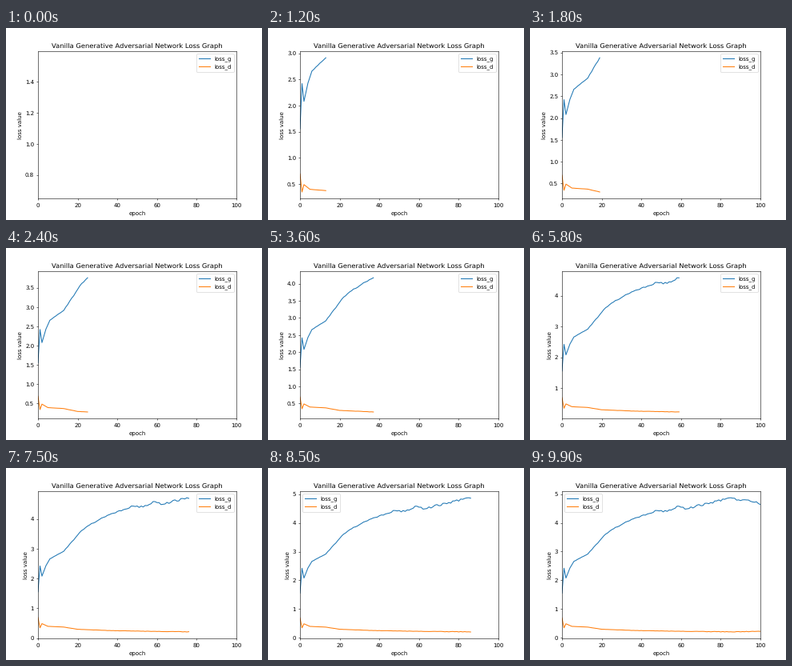
Write a matplotlib script that moves like this. It is 320 px wide and 240 px high and loops after 10000 ms.

```python
import numpy as np
import matplotlib.pyplot as plt
from matplotlib.animation import FuncAnimation

EPOCHS = 100
FRAMES = 100
INTERVAL = 100

plt.rcParams["text.hinting"] = "none"

rng = np.random.default_rng(4)
epochs = np.arange(EPOCHS + 1)


def loss_curve(points, wobble):
    """Join key points and add jitter that grows with the epoch."""
    keys, values = zip(*points)
    jitter = rng.uniform(-wobble, wobble, epochs.size) * epochs / EPOCHS
    jitter[list(keys)] = 0
    return np.interp(epochs, keys, values) + jitter


loss_g = loss_curve([(0, 1.554), (1, 2.42), (2, 2.08), (4, 2.43), (6, 2.66),
                     (13, 2.915), (22, 3.61), (25, 3.76), (35, 4.12),
                     (48, 4.43), (53, 4.4), (59, 4.58), (62, 4.48),
                     (75, 4.71), (84, 4.87), (93, 4.8), (100, 4.64)], 0.06)
loss_d = loss_curve([(0, 0.69), (1, 0.344), (2, 0.485), (5, 0.395),
                     (13, 0.37), (20, 0.295), (37, 0.25), (60, 0.222),
                     (85, 0.206), (100, 0.22)], 0.01)

fig, ax = plt.subplots(figsize=(6.4, 4.8), dpi=50)
fig.subplots_adjust(bottom=0.111)  # keeps the lower spine on its pixel row
line_g, = ax.plot([], [], label="loss_g")
line_d, = ax.plot([], [], label="loss_d")
ax.set_xlim(0, EPOCHS)
ax.set_title("Vanilla Generative Adversarial Network Loss Graph")
ax.set_xlabel("epoch")
ax.set_ylabel("loss value")
ax.legend(loc="best")


def update(frame):
    # The first picture holds one point; the next already reaches epoch 2
    count = frame + 2 if frame else 1
    line_g.set_data(epochs[:count], loss_g[:count])
    line_d.set_data(epochs[:count], loss_d[:count])
    ax.relim()
    ax.autoscale_view(scalex=False)
    return line_g, line_d


def reset():
    return update(0)


anim = FuncAnimation(fig, update, frames=FRAMES, init_func=reset,
                     interval=INTERVAL, repeat=True, repeat_delay=0)
plt.show()
```
